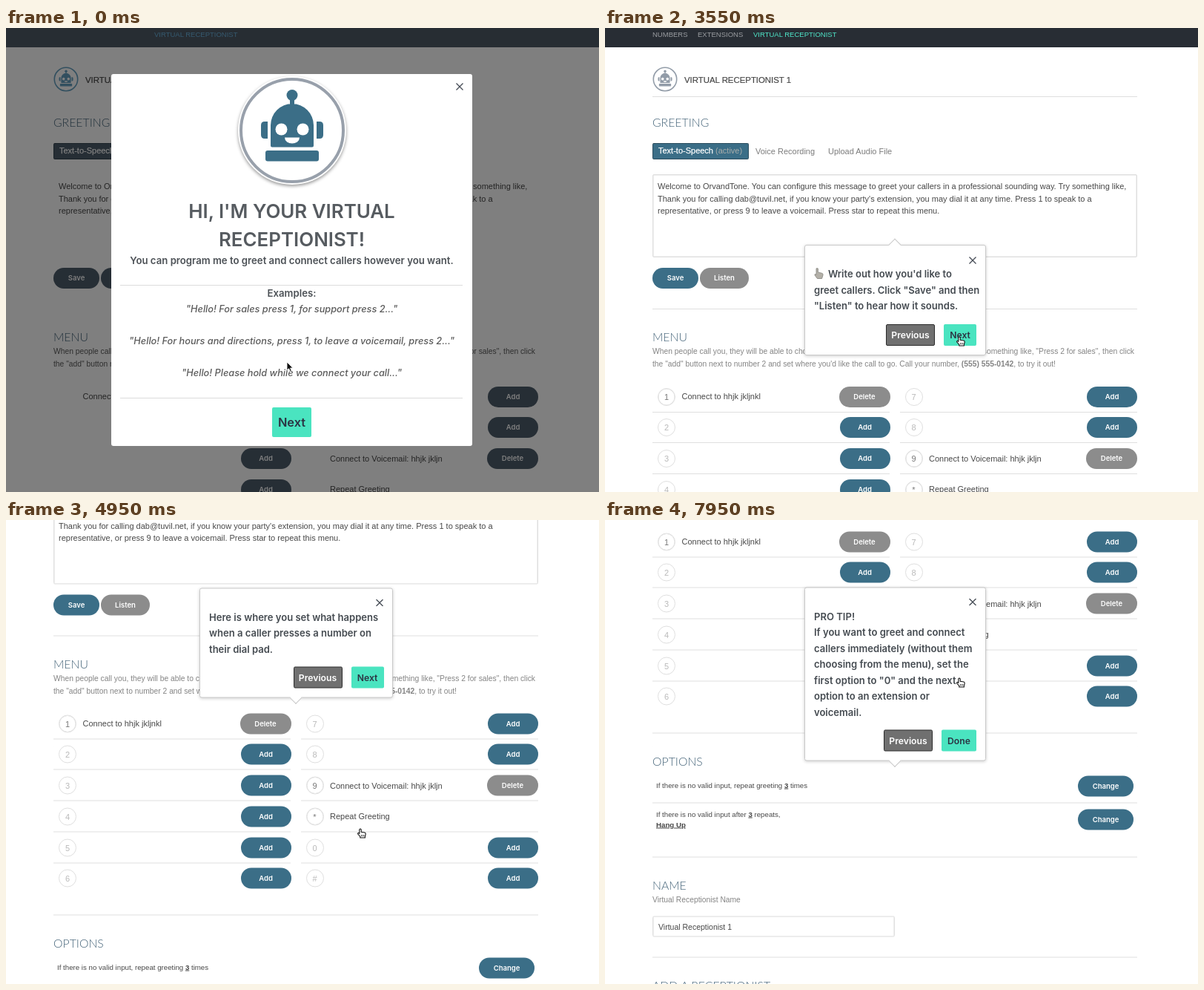
Recreate the animation shown at these times as an HTML page. Size 800 px wide and 625 px high, loop 8000 ms.

```html
<!DOCTYPE html>
<html lang="en">
<head>
<meta charset="utf-8">
<title>Receptionist tour</title>
<style>
  html, body { margin: 0; width: 100%; height: 100%; overflow: hidden; background: #fff; }
  #stage {
    position: relative; width: 800px; height: 625px; overflow: hidden; background: #fff;
    font: 11px/20px "Liberation Sans", Arial, sans-serif; color: #484848;
    --blue: #3b6e87; --gray: #8c8c8c; --line: #dfdfdf; --bar: #282d34; --nav: #9a9da1;
    --accent: #4fe6c9; --logo: #929ca8; --para: #848484;
  }
  #stage.dim {
    --blue: #4c5c6a; --gray: #4c5c6a; --line: transparent; --bar: #4e5a66; --nav: transparent;
    --accent: #6ab4e0; --logo: #64a0c0; --para: #5c5c5c;
  }
  #stage * { box-sizing: border-box; }
  #page { position: absolute; inset: 0; }
  #page > *, .abs, #shade, #modal, #modal > *, .cursor { position: absolute; }
  .t { white-space: pre; }
  .bar { left: 0; top: 0; width: 800px; height: 26px; background: var(--bar); }
  .nav { font-size: 9.5px; color: var(--nav); }
  .nav.on { color: var(--accent); }
  .title { font-size: 11.4px; -webkit-text-stroke: .2px; }
  .head { font: 300 15.8px/20px Lato, sans-serif; color: #46657a; }
  .soft { color: #7c7c7c; }
  .para { font-size: 10.3px; color: var(--para); }
  .small { font-size: 9.7px; }
  .small u { font-weight: bold; }
  .rule { height: 1px; background: var(--line); }
  .box { border: 1px solid #c8c8c8; border-color: var(--line); border-radius: 2px; box-shadow: inset 0 0 0 .5px var(--line); }
  .tab {
    background: var(--blue); border: 1px dotted #1c2c36; border-radius: 2px;
    color: #fff; padding-left: 7px; line-height: 19px; white-space: pre; -webkit-text-stroke: .25px;
  }
  .tab i { font-style: normal; color: #a9adab; -webkit-text-stroke: 0; }
  .pill {
    height: 28px; border-radius: 14px; background: var(--blue); color: #fff; text-align: center;
    font: 600 9.5px/28px Inter, sans-serif;
  }
  .pill.gray { background: var(--gray); }
  .key {
    width: 24px; height: 24px; border: 1px solid var(--line); border-radius: 50%;
    text-align: center; line-height: 23px; color: #b9b9b9;
  }
  .key.used { color: #777; box-shadow: inset 0 0 0 .5px var(--line); }
  .dim .key { color: transparent; }
  .pop {
    background: #fff; border: 1px solid #c9c9c9; border-radius: 3px; box-shadow: 0 1px 4px #0003;
    font: 600 13.05px/21.6px Inter, sans-serif; color: #454b51;
  }
  .pop .tip { width: 12px; height: 12px; background: #fff; transform: rotate(45deg); border: 0 solid #c9c9c9; }
  .pop .tip.up { top: -7px; border-width: 1px 0 0 1px; }
  .pop .tip.down { bottom: -7px; border-width: 0 1px 1px 0; }
  .pop .copy { left: 12px; top: 28px; white-space: pre; }
  .pop .copy svg { margin-right: 6px; vertical-align: -2px; }
  .pop .row { right: 11.5px; bottom: 12px; display: flex; gap: 12px; font-size: 12.2px; line-height: 27px; text-align: center; }
  .prev { width: 66px; height: 29px; background: #707070; color: #fff; border: 1px solid #2c2c2c; border-radius: 2px; }
  .next { background: #4ae4c0; color: #2b3443; border-radius: 2px; }
  .pop .next { height: 29px; line-height: 29px; }
  #shade { inset: 0; background: rgba(0, 0, 0, .5); }
  #modal {
    left: 142px; top: 62px; width: 487px; height: 501px; background: #fff; border-radius: 3px;
    font: 600 13.2px/20px Inter, sans-serif; color: #4c5156;
  }
  #modal .c { left: 0; width: 100%; text-align: center; white-space: pre; }
  #modal .big { font-size: 25.9px; color: #565b60; }
  #modal .ex { font-size: 12.73px; font-weight: 500; font-style: italic; color: #5a5a5a; }
  #modal .rule { left: 12px; width: 462px; background: #dcdcdc; }
  #modal .next { left: 217px; top: 449px; width: 53px; height: 40px; font-size: 16.4px; line-height: 40px; text-align: center; }
  .badge { left: 169px; top: .5px; width: 150px; height: 150px; overflow: visible; color: #3b6e87; filter: drop-shadow(0 2px 2px #0006); }
  .cursor { left: 0; top: 0; overflow: visible; }
</style>
</head>
<body>
<svg width="0" height="0" style="position:absolute">
  <symbol id="robot" viewBox="-75 -75 150 150" overflow="visible">
    <g fill="currentColor">
      <circle cy="-47.5" r="7.5"/>
      <path d="M-3-44H3V-30H-3ZM-29 20.5V-7A29 29 0 0 1 29-7V20.5Q29 22.5 27 22.5H-27Q-29 22.5-29 20.5Z"/>
      <path d="M-33-12V11H-37Q-42 11-42 6V-7Q-42-12-37-12ZM33-12V11H37Q42 11 42 6V-7Q42-12 37-12Z"/>
      <rect x="-36" y="27" width="72" height="14.5" rx="3"/>
    </g>
    <g fill="#fff">
      <circle cx="-14.5" cy="-1.5" r="8"/><circle cx="14.5" cy="-1.5" r="8"/>
      <path d="M-10 9.5H10A10 8 0 0 1-10 9.5Z"/>
    </g>
  </symbol>
</svg>
<div id="stage" class="dim">
  <div id="page"></div>
  <div id="shade"></div>
  <div id="modal">
    <svg class="badge" viewBox="-75 -75 150 150">
      <circle r="73" fill="#fff"/><circle r="69" fill="none" stroke="#98a0ab" stroke-width="4"/>
      <use href="#robot" x="-75" y="-75" width="150" height="150"/>
    </svg>
    <div class="c big" style="top:175px">HI, I'M YOUR VIRTUAL</div>
    <div class="c big" style="top:212.5px">RECEPTIONIST!</div>
    <div class="c" style="top:241px">You can program me to greet and connect callers however you want.</div>
    <div class="rule" style="top:284px"></div>
    <div class="c" style="top:285px">Examples:</div>
    <div class="c ex" style="top:307px">"Hello! For sales press 1, for support press 2..."</div>
    <div class="c ex" style="top:350px">"Hello! For hours and directions, press 1, to leave a voicemail, press 2..."</div>
    <div class="c ex" style="top:393px">"Hello! Please hold while we connect your call..."</div>
    <div class="rule" style="top:436px"></div>
    <div class="next">Next</div>
  </div>
  <svg class="cursor" id="arrow" width="12" height="16">
    <path d="M0 0V11L2.6 8.8L4.3 12.6L6.2 11.8L4.6 8H8Z" fill="#111" stroke="#fff" stroke-width=".8"/>
  </svg>
  <svg class="cursor" id="hand" width="12" height="16">
    <path d="M-1.2 1Q0-1 1.2 1V4.2L6 5Q7.4 5.4 7.2 7.2L6.4 10V12H-.2V10.4L-3.4 6.8Q-3.6 5.2-2 5.6L-1.2 6.3Z" fill="#fff" stroke="#111" stroke-width="1.1"/>
    <path d="M1.4 8V10.4M3.1 8V10.4M4.8 8V10.4" stroke="#111" stroke-width=".7"/>
  </svg>
</div>
<script>
const $ = id => document.getElementById(id);
const stage = $('stage'), page = $('page'), shade = $('shade'), modal = $('modal');

function add(cls, x, y, w, h, html = '', parent = page) {
  const el = document.createElement('div');
  el.className = cls;
  el.style.cssText = `left:${x}px;top:${y}px;` + (w ? `width:${w}px;` : '') + (h ? `height:${h}px;` : '');
  el.innerHTML = html;
  parent.append(el);
  return el;
}
// The y of text and buttons is their vertical centre.
const text = (x, y, str, cls = '') => add('t ' + cls, x, y - 10, 0, 0, str);
const rule = (y, x = 64, w = 654) => add('rule', x, y, w, 1);
const pill = (x, y, w, label, gray) => add('pill' + (gray ? ' gray' : ''), x, y - 14, w, 28, label);
const close = (x, y, parent) => add('abs', x - 5, y - 5, 10, 10,
  '<svg width="10" height="10" style="display:block"><path d="M.5 .5L9.5 9.5M9.5 .5L.5 9.5" stroke="#454b55" stroke-width="1.3"/></svg>', parent);

// Header and greeting
add('bar', 0, 0, 800, 26);
text(64, 9, 'NUMBERS', 'nav');
text(125, 9, 'EXTENSIONS', 'nav');
text(200, 9, 'VIRTUAL RECEPTIONIST', 'nav on');
add('', 64, 52, 34, 34, `<svg width="34" height="34" style="display:block;color:var(--logo)">
  <circle cx="17" cy="17" r="15.7" fill="none" stroke="currentColor" stroke-width="1.6"/>
  <use href="#robot" width="34" height="34"/></svg>`);
text(107, 70, 'VIRTUAL RECEPTIONIST 1', 'title');
rule(92);
text(64, 127, 'GREETING', 'head');
add('tab', 64, 155, 130, 22, 'Text-to-Speech <i>(active)</i>');
text(203, 166, 'Voice Recording', 'soft');
text(301, 166, 'Upload Audio File', 'soft');
add('box', 64, 197, 654, 112);
[
  'Welcome to OrvandTone. You can configure this message to greet your callers in a professional sounding way. Try something like,',
  "Thank you for calling dab@tuvil.net, if you know your party's extension, you may dial it at any time. Press 1 to speak to a",
  'representative, or press 9 to leave a voicemail. Press star to repeat this menu.'
].forEach((line, i) => text(71, 213 + 16.7 * i, line));
pill(64, 336.5, 62, 'Save');
pill(128, 336.5, 66, 'Listen', true);
rule(378);

// Menu
text(64, 415.5, 'MENU', 'head');
text(64, 436, 'When people call you, they will be able to choose from the menu.', 'para');
text(0, 436, 'something like, "Press 2 for sales", then click', 'para').style.cssText += 'left:auto;right:86px';
text(64, 453, 'the "add" button next to number 2 and set where you\'d like the call to go. Call your number, <b>(555) 555-0142</b>, to try it out!', 'para');
const used = { 1: 'Connect to hhjk jkljnkl', 9: 'Connect to Voicemail: hhjk jkljn', '*': 'Repeat Greeting' };
[...'123456789*0#'].forEach((key, i) => {
  const x = i < 6 ? 64 : 397.5, y = 496.5 + 41.75 * (i % 6), label = used[key];
  add('key' + (label ? ' used' : ''), x + 7, y - 12, 24, 24, key);
  if (label) text(x + 39.5, y - .5, label);
  if (key !== '*') pill(x + (label ? 251.5 : 252.5), y, label ? 69 : 68, label ? 'Delete' : 'Add', label);
  if (i % 6 < 5) rule(Math.round(y + 20), x, 320);
});
rule(754);

// Options and name
text(64, 791.5, 'OPTIONS', 'head');
text(69, 825, 'If there is no valid input, repeat greeting <u>3</u> times', 'small');
pill(638, 825.5, 75, 'Change');
rule(848);
text(69, 863.5, 'If there is no valid input after <u>3</u> repeats,', 'small');
text(69, 877.5, '<u>Hang Up</u>', 'small');
pill(638, 871, 75, 'Change');
rule(921);
text(64, 958.5, 'NAME', 'head');
text(64, 978.5, 'Virtual Receptionist Name', 'para');
add('box', 64, 1000.5, 327, 28);
text(72, 1015, 'Virtual Receptionist 1').style.fontSize = '10.5px';
rule(1056);
text(64, 1093.5, 'ADD A RECEPTIONIST', 'head');

// Tour bubbles
function bubble(x, y, w, h, tip, action, actionWidth, lines) {
  const el = add('pop', x, y, w, h);
  el.innerHTML = `<div class="abs tip ${tip}" style="left:${391 - x - 7}px"></div>
    <div class="abs copy">${lines.join('\n')}</div>
    <div class="abs row"><div class="prev">Previous</div><div class="next" style="width:${actionWidth}px">${action}</div></div>`;
  close(w - 19, 19.5, el);
  return el;
}
const pointer = `<svg width="13" height="15"><path d="M3 1Q4.2 0 5.4 1V6L11 7.4Q12.6 8 12 10L10.6 14.5H4.4L1 10Q.6 8.4 2 8.6L3 9.4Z" fill="#b3b0a8" stroke="#85837e" stroke-width=".8"/></svg>`;
const bubbles = [
  { from: 2150, to: 4200, el: bubble(269, 292, 244.5, 148.5, 'up', 'Next', 44,
    [pointer + "Write out how you'd like to", 'greet callers. Click "Save" and then', '"Listen" to hear how it sounds.']) },
  { from: 4200, to: 7100, el: bubble(261, 313.5, 261, 148.5, 'down', 'Next', 44,
    ['Here is where you set what happens', 'when a caller presses a number on', 'their dial pad.']) },
  { from: 7100, to: 8000, el: bubble(269, 557.5, 244.5, 234.5, 'down', 'Done', 47,
    ['PRO TIP!', 'If you want to greet and connect', 'callers immediately (without them', 'choosing from the menu), set the',
      'first option to "0" and the next', 'option to an extension or', 'voicemail.']) }
];
close(470, 17, modal);

// Motion: rows of [time, value...], eased between rows
const LOOP = 8000;
const scrollKeys = [[0, 0], [4475, 0], [4875, 222.5], [7400, 222.5], [7800, 467.5]];
const fadeKeys = [[0, 1], [1800, 1], [2080, 0]];
const cursorKeys = [[0, 379, 450], [500, 379, 450], [1250, 395, 531], [2250, 395, 531],
  [3150, 478, 416], [5600, 478, 416], [6300, 477, 212], [7000, 477, 212], [7300, 478, 213]];
const handTimes = [[1000, 2250], [2920, 5600], [6170, LOOP]];

const swing = p => .5 - Math.cos(p * Math.PI) / 2;
const within = (t, from, to) => t >= from && t < to;
function at(keys, t) {
  const next = keys.findIndex(k => k[0] > t);
  if (next < 0) return keys[keys.length - 1].slice(1);
  const a = keys[next - 1], b = keys[next], p = swing((t - a[0]) / (b[0] - a[0]));
  return a.slice(1).map((v, i) => v + (b[i + 1] - v) * p);
}
const show = (el, on) => { el.style.visibility = on ? 'visible' : 'hidden'; };

function draw(now) {
  const t = now % LOOP;
  const [scroll] = at(scrollKeys, t), [fade] = at(fadeKeys, t), [x, y] = at(cursorKeys, t);
  page.style.transform = `translateY(${-scroll}px)`;
  stage.classList.toggle('dim', t < 1800);
  shade.style.opacity = modal.style.opacity = fade;
  bubbles.forEach(b => show(b.el, within(t, b.from, b.to)));
  const pointing = handTimes.some(([from, to]) => within(t, from, to));
  for (const id of ['arrow', 'hand']) {
    $(id).style.transform = `translate(${x}px, ${y}px)`;
    show($(id), (id === 'hand') === pointing);
  }
}
const start = performance.now();
function tick() {
  draw(performance.now() - start);
  requestAnimationFrame(tick);
}
tick();
</script>
</body>
</html>
```
